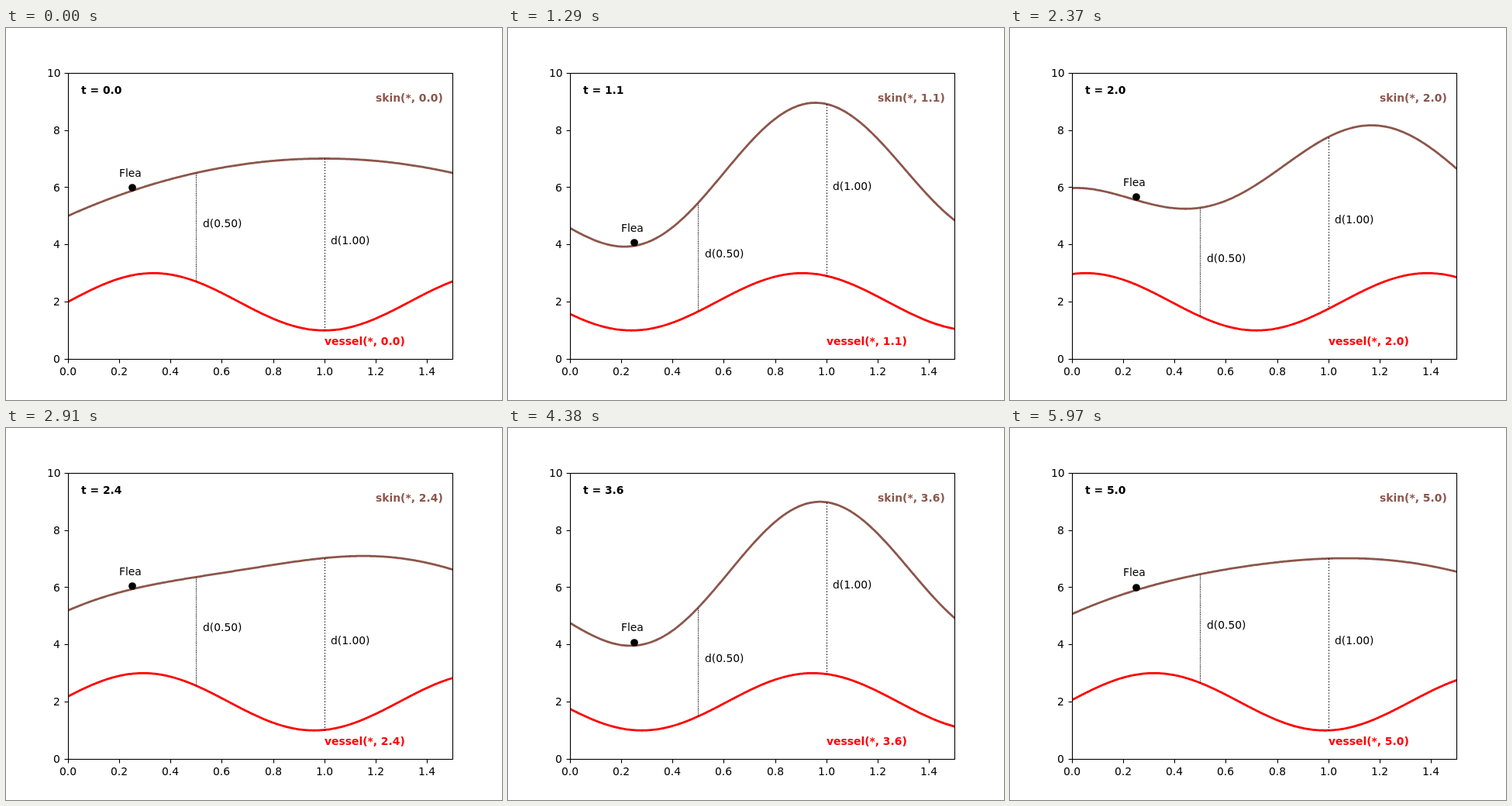
Recreate the animation shown at these times as an HTML page with a canvas. Size 640 by 480 pixels, loop 6 s.

```html
<!DOCTYPE html>
<html lang="en">
<head>
<meta charset="utf-8">
<title>Skin and vessel</title>
<style>
  html, body { margin: 0; width: 100%; height: 100%; overflow: hidden; background: #fff; }
  canvas { display: block; }
</style>
</head>
<body>
<canvas id="stage" width="640" height="480"></canvas>
<script>
const ctx = document.getElementById('stage').getContext('2d');

const STEP_MS = 30, STEPS = 200;
const LEFT = 80, RIGHT = 576, TOP = 57.6, BOTTOM = 427.2;
const BROWN = '#8c564b', RED = '#ff0000';
const FONT = '13.889px "DejaVu Sans", sans-serif';

const px = x => LEFT + x * (RIGHT - LEFT) / 1.5;
const py = y => BOTTOM - y * (BOTTOM - TOP) / 10;
const snap = v => Math.round(v) + 0.5;

// The vessel is a travelling wave; the skin keeps a fixed distance to it.
const vessel = (x, t) => 2 + Math.sin(1.5 * Math.PI * x - 0.8 * Math.PI * t);
const restSkin = x => 5 + 4 * x - 2 * x * x;
const skin = (x, t) => restSkin(x) - vessel(x, 0) + vessel(x, t);

// One decimal, exact quarters rounded to the even digit.
const label = t => (t % 1 === 0.25 ? t - 0.01 : t).toFixed(1);

function text(str, x, y, { color = '#000', bold = false, align = 0 } = {}) {
  ctx.font = (bold ? 'bold ' : '') + FONT;
  ctx.fillStyle = color;
  const left = x - align * ctx.measureText(str).width;
  ctx.fillText(str, Math.round(left), Math.round(y));
}

function line(x1, y1, x2, y2, dash = []) {
  ctx.strokeStyle = '#000';
  ctx.lineWidth = 1.11;
  ctx.setLineDash(dash);
  ctx.beginPath();
  ctx.moveTo(x1, y1);
  ctx.lineTo(x2, y2);
  ctx.stroke();
  ctx.setLineDash([]);
}

function curve(fn, t, color) {
  ctx.save();
  ctx.beginPath();
  ctx.rect(LEFT, TOP, RIGHT - LEFT, BOTTOM - TOP);
  ctx.clip();
  ctx.beginPath();
  for (let i = -2; i <= 302; i++) ctx.lineTo(px(i / 200), py(fn(i / 200, t)));
  ctx.strokeStyle = color;
  ctx.lineWidth = 2.78;
  ctx.lineJoin = 'round';
  ctx.stroke();
  ctx.restore();
}

function distance(x, t, dash) {
  const a = skin(x, t), b = vessel(x, t);
  line(snap(px(x)), snap(py(a)), snap(px(x)), snap(py(b)), dash);
  text(`d(${x.toFixed(2)})`, px(x + 0.025), py((a + b) / 2));
}

function axes() {
  ctx.strokeStyle = '#000';
  ctx.lineWidth = 1.11;
  ctx.strokeRect(snap(LEFT), snap(TOP), RIGHT - LEFT, snap(BOTTOM) - snap(TOP));
  for (let i = 0; i < 8; i++) {
    const x = px(i / 5), base = snap(BOTTOM);
    line(snap(x), base, snap(x), base + 5);
    text((i / 5).toFixed(1), x, 448, { align: 0.5 });
  }
  for (let v = 0; v <= 10; v += 2) {
    const y = py(v), edge = snap(LEFT);
    line(edge, snap(y), edge - 5, snap(y));
    text(String(v), 70.3, y + 5.1, { align: 1 });
  }
}

function flea(t) {
  const y = skin(0.25, t);
  ctx.fillStyle = '#000';
  ctx.beginPath();
  ctx.arc(Math.round(px(0.25)), Math.round(py(y + 0.1)), 4.86, 0, 2 * Math.PI);
  ctx.fill();
  text('Flea', px(0.2), py(y + 0.5));
}

function draw(t) {
  ctx.fillStyle = '#fff';
  ctx.fillRect(0, 0, 640, 480);
  curve(skin, t, BROWN);
  curve(vessel, t, RED);
  distance(0.5, t, [1.1, 1.2]);
  distance(1, t, [1.39, 2.29]);
  flea(t);
  axes();
  const now = label(t);
  text(`t = ${now}`, px(0.05), py(9.25), { bold: true });
  text(`skin(*, ${now})`, px(1.2), py(9), { color: BROWN, bold: true });
  text(`vessel(*, ${now})`, px(1), py(0.5), { color: RED, bold: true });
}

function tick() {
  const step = Math.floor((performance.now() + 0.01) / STEP_MS) % STEPS;
  draw(step / 40);
  requestAnimationFrame(tick);
}
tick();
</script>
</body>
</html>
```
